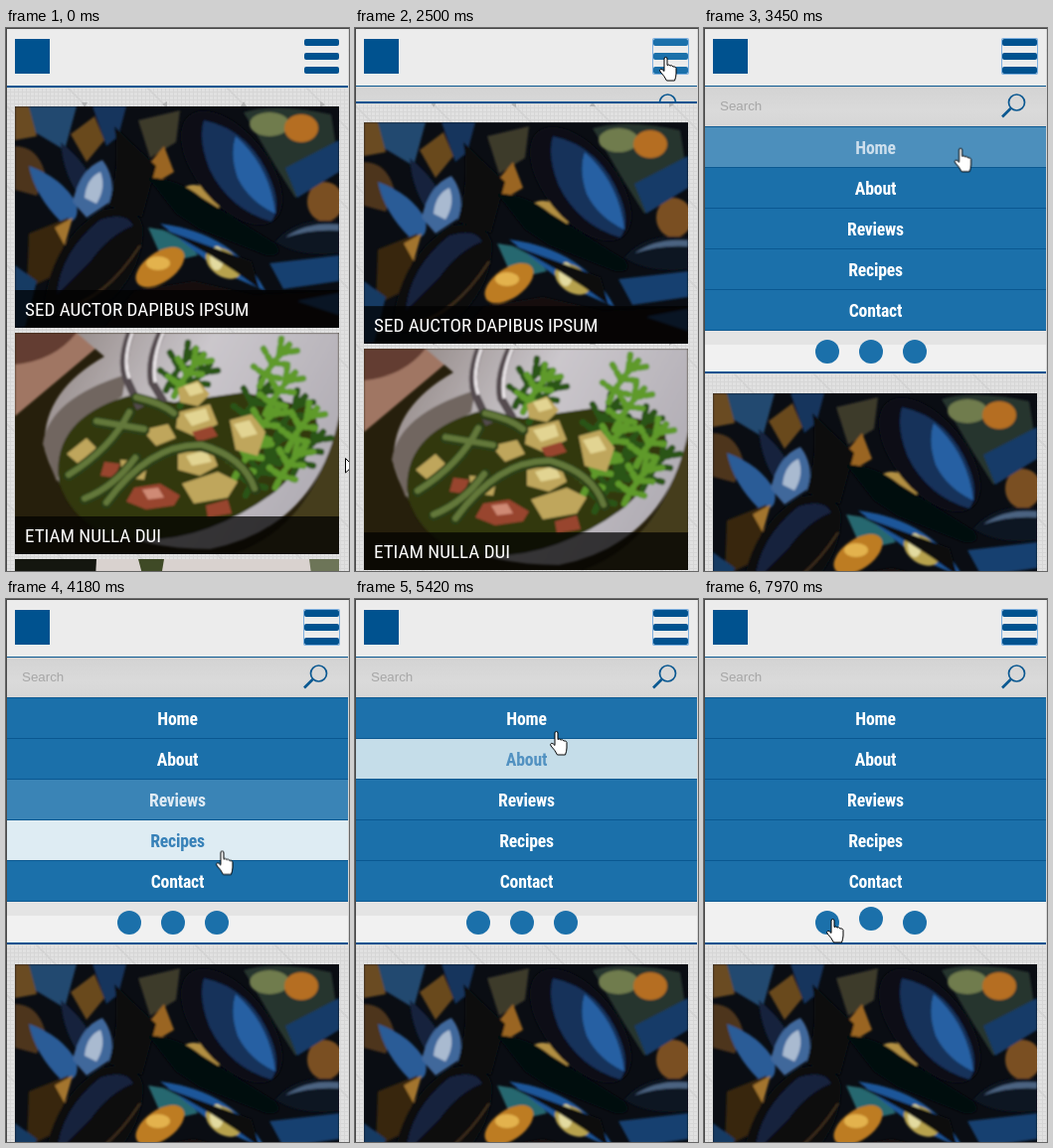
Write an HTML page that moves like this. It is 345 px wide and 547 px high and loops after 8000 ms.

```html
<!DOCTYPE html>
<html lang="en">
<head>
<meta charset="utf-8">
<title>Mobile menu</title>
<style>
@property --h { syntax: '<number>'; inherits: true; initial-value: 0 }
* { box-sizing: border-box }
html, body { margin: 0; width: 100%; height: 100%; overflow: hidden }
body { position: relative; background: #dedede; font-family: "Roboto Condensed", Roboto, sans-serif; font-stretch: 75% }
.stage, .stage > *, .abs { position: absolute }
.stage { left: 0; top: 0; width: 345px; height: 547px; overflow: hidden }
.stage * { animation: 8s ease infinite both }
.back { left: 0; top: 0 }
.frame { inset: 0; border: solid #4a4a4a; border-width: 1px 0 0 1px }

.page { left: 9px; top: 79px; width: 326px; animation-name: page; animation-timing-function: linear }
.card { position: relative; height: 223px; margin-bottom: 5px; overflow: hidden; opacity: calc(1 - .16 * var(--h)) }
.card svg { display: block }
.card p { position: absolute; left: 0; right: 0; bottom: 0; height: 38px; margin: 0; padding-left: 10px;
  background: rgba(0, 0, 0, .72); color: #fff; font-size: 19.1px; line-height: 39px; white-space: nowrap }
.c1 { animation-name: c1 }
.c2 { animation-name: c2 }

.head { left: 1px; top: 1px; width: 343px; height: 58px; background: #ececec; border-bottom: 1px solid #0a5891 }
.logo { left: 8px; top: 10px; width: 35px; height: 35px; background: #00528f }
.burger { left: 298px; top: 9px; width: 37px; height: 37px; border-radius: 2px; animation-name: ring; animation-timing-function: step-end }
.burger i { left: 1px; width: 35px; height: 7px; border-radius: 2px; animation-name: bar }

.nav { left: 1px; top: 57px; width: 343px; height: 3px; overflow: hidden; background: #f1f1f1;
  border-bottom: 2px solid #00528f; animation-name: nav; animation-timing-function: linear }
.search { left: 0; top: 2px; width: 343px; height: 40px; background: linear-gradient(#d3d3d3, #dadada 60%, #d6d6d6); color: #a6a6a6;
  font: 13.33px/40px "Liberation Sans", Arial, sans-serif; padding-left: 15px }
.search svg { position: absolute; left: 296px; top: 5px }
.menu { left: 0; top: 42px; width: 343px; border-top: 1px solid #0a5891 }
.menu a { display: block; height: 41px; border-bottom: 1px solid #0a5891; text-align: center;
  font-size: 17.7px; font-weight: 700; letter-spacing: -.2px; line-height: 42px;
  background: color-mix(in srgb, #dfedf3 calc(var(--h) * 100%), #1b70aa);
  color: color-mix(in srgb, #3680b8 calc(var(--h) * 100%), #fff) }
.strip { left: 0; top: 248px; width: 343px; height: 14px; background: #e4e4e4; animation-name: strip; animation-timing-function: step-end }
.dot { top: 257px; width: 24px; height: 24px; border-radius: 50%; background: #1b70aa; transform: translateY(calc(-4px * var(--h))) }

.tip { left: 200px; top: 135px; width: 103px; height: 26px; background: #fafafa; border: 1px solid #767676; box-shadow: 3px 3px 2px rgba(0, 0, 0, .4);
  color: #575757; font: 15px/24px "Open Sans", sans-serif; text-align: center; white-space: nowrap; animation-name: tip }
.cursor { left: 0; top: 0; width: 20px; height: 27px; animation-name: cursor; animation-timing-function: linear }
.cursor path { fill: #fff; stroke: #000; animation-timing-function: step-end }
.arrow { animation-name: arrow }
.hand { animation-name: hand }

/* one loop is 8000 ms, so 1% is 80 ms */
@keyframes page {
  0%, 30.28% { transform: none; animation-timing-function: cubic-bezier(.37, 0, .63, 1) }
  36.7%, 100% { transform: translateY(289px) }
}
@keyframes nav {
  0%, 30.28% { height: 3px; animation-timing-function: cubic-bezier(.37, 0, .63, 1) }
  36.7%, 100% { height: 291px }
}
@keyframes c1 { 0%, 12.2% { --h: 0 } 15.8%, 17.8% { --h: 1 } 21.5%, 100% { --h: 0 } }
@keyframes c2 { 0%, 6.8% { --h: 0 } 10.4%, 11.8% { --h: 1 } 15.5%, 100% { --h: 0 } }
@keyframes bar { 0%, 20.5% { background: #00528f } 22%, 39.5% { background: #1b70aa } 41.5%, 100% { background: #00528f } }
@keyframes ring { 0% { box-shadow: none } 29.75%, 100% { box-shadow: inset 0 0 0 1px #7fb0df } }
@keyframes home { 0%, 42.8% { --h: 0 } 44.5% { --h: .85 } 47.5%, 67.7% { --h: 0 } 71%, 80.45% { --h: 1 } 83.75%, 100% { --h: 0 } }
@keyframes about { 0%, 44.5% { --h: 0 } 47% { --h: .9 } 50.5%, 65.4% { --h: 0 } 67.5% { --h: .94 } 70.5%, 80.45% { --h: 0 } 80.9% { --h: .18 } 82%, 100% { --h: 0 } }
@keyframes reviews { 0%, 47% { --h: 0 } 50.1% { --h: 1 } 54.1%, 63.6% { --h: 0 } 65.4% { --h: .6 } 68.5%, 80.9% { --h: 0 } 82% { --h: .35 } 84.5%, 100% { --h: 0 } }
@keyframes recipes { 0%, 50.1% { --h: 0 } 52.5%, 52.9% { --h: 1 } 55.75%, 62.6% { --h: 0 } 63.6% { --h: .4 } 66%, 82% { --h: 0 } 83.1% { --h: .35 } 85.5%, 100% { --h: 0 } }
@keyframes contact { 0%, 52.9% { --h: 0 } 55.75%, 62.6% { --h: 1 } 65.5%, 83.1% { --h: 0 } 86.2% { --h: 1 } 89.1%, 100% { --h: 0 } }
@keyframes strip { 0% { opacity: 1 } 88%, 100% { opacity: 0 } }
@keyframes d3 { 0%, 87.5% { --h: 0 } 89.1%, 92% { --h: 1 } 94.4%, 100% { --h: 0 } }
@keyframes d2 { 0%, 92.6% { --h: 0 } 94.4%, 99.5% { --h: 1 } 100% { --h: .95 } }
@keyframes tip { 0%, 76.5% { opacity: 0 } 78.5%, 81% { opacity: 1 } 82.5%, 100% { opacity: 0 } }
@keyframes arrow { 0% { visibility: visible } 6.8%, 100% { visibility: hidden } }
@keyframes hand { 0% { visibility: hidden } 6.8%, 100% { visibility: visible } }
@keyframes cursor {
  0%, 6.1% { transform: translate(341px, 433px) }
  9% { transform: translate(300px, 385px) }
  12.2% { transform: translate(288px, 290px) }
  15.9%, 16.6% { transform: translate(292px, 190px) }
  22%, 39.1% { transform: translate(312px, 29px) }
  43.1% { transform: translate(258px, 120px) }
  44.5% { transform: translate(240px, 145px) }
  47% { transform: translate(224px, 184px) }
  49.2% { transform: translate(219px, 210px) }
  52.2% { transform: translate(217px, 253px) }
  55.7%, 62% { transform: translate(212px, 280px) }
  65% { transform: translate(206px, 190px) }
  67.75% { transform: translate(202px, 133px) }
  69.9%, 79.7% { transform: translate(200px, 114px) }
  80.9% { transform: translate(198px, 183px) }
  83.1% { transform: translate(201px, 264px) }
  86.25%, 87% { transform: translate(205px, 306px) }
  89.1%, 91.4% { transform: translate(212px, 322px) }
  94.4%, 97.4% { transform: translate(168px, 322px) }
  99.6%, 100% { transform: translate(129px, 322px) }
}
</style>
</head>
<body>
<div class="stage">
  <svg class="back" width="345" height="547">
    <defs>
      <pattern id="grid" width="4" height="4" patternUnits="userSpaceOnUse"><path d="M0 .5H4M.5 0V4" stroke="#d6d6d6"/></pattern>
      <pattern id="marks" x="39" y="37" width="320" height="80" patternUnits="userSpaceOnUse">
        <path d="M0 0L80 80M80 0l80 80M160 0l80 80M240 0l80 80" stroke="#d3d3d3" stroke-width="2"/>
        <path d="M37 38h6l-3 5zM123 37v6l-5-3zM197 42h6l-3-5zM277 37v6l5-3z" fill="#b4b4b4"/>
      </pattern>
      <filter id="soft"><feGaussianBlur stdDeviation="1.3"/></filter>
    </defs>
    <rect width="345" height="547" fill="#e1e1e1"/>
    <rect width="345" height="547" fill="url(#grid)"/>
    <rect width="345" height="547" fill="url(#marks)"/>
  </svg>

  <div class="page">
    <div class="card c1">
      <svg width="326" height="223">
        <rect width="326" height="223" fill="#0a0d13"/>
        <g filter="url(#soft)">
          <path d="M8 0H62L50 44 20 26z" fill="#23486f"/>
          <path d="M0 0H14L22 30 0 34z" fill="#6b4c20"/>
          <path d="M0 40Q22 40 30 66L22 90 0 84z" fill="#4d351c"/>
          <path d="M56 28L80 10 90 34 72 56z" fill="#69491f"/>
          <path d="M78 0H112L104 30 92 40z" fill="#18355d"/>
          <path d="M124 14L166 4 162 36 136 52z" fill="#3c3a2c"/>
          <path d="M128 66L150 40 160 66 140 78z" fill="#9a6521"/>
          <path d="M230 6Q262 -4 318 8L326 60 282 92 262 60z" fill="#27362f"/>
          <ellipse cx="256" cy="18" rx="20" ry="12" fill="#6f7c4d"/>
          <ellipse cx="288" cy="22" rx="17" ry="14" fill="#b56e23"/>
          <ellipse cx="312" cy="96" rx="18" ry="20" fill="#7a5022"/>
          <path d="M272 62L326 34V66L284 92z" fill="#163b68"/>
          <path d="M14 60Q20 90 46 116 66 120 62 98 48 72 14 60z" fill="#2a5c97"/>
          <path d="M46 36Q74 58 84 88L70 98Q48 70 46 36z" fill="#12233d"/>
          <path d="M58 96Q66 62 88 54 102 72 96 96L72 112z" fill="#41679b"/>
          <path d="M70 92Q72 72 86 66 92 82 82 98z" fill="#a9bad0"/>
          <path d="M100 20Q106 60 94 100L128 112 142 60z" fill="#07090e"/>
          <path d="M14 128L54 112 44 168 12 184z" fill="#38270f"/>
          <path d="M40 122L58 112 50 140z" fill="#a3742e"/>
          <path d="M0 160L22 176 10 223H0z" fill="#163a63"/>
          <path d="M134 122L170 128 184 150 150 158z" fill="#286770"/>
          <ellipse cx="146" cy="162" rx="28" ry="15" transform="rotate(-35 146 162)" fill="#bd7c21"/>
          <ellipse cx="144" cy="158" rx="12" ry="7" fill="#e3b24d"/>
          <ellipse cx="188" cy="92" rx="20" ry="11" transform="rotate(25 188 92)" fill="#b28f43"/>
          <ellipse cx="218" cy="62" rx="68" ry="36" transform="rotate(51 218 62)" fill="#080b13"/>
          <path d="M190 14Q238 24 258 76 268 102 258 116 216 104 196 64 184 34 190 14z" fill="#14305a"/>
          <path d="M222 30Q256 60 262 108 236 96 224 72 216 48 222 30z" fill="#2860a3"/>
          <path d="M146 118Q222 128 252 186L206 166z" fill="#1f569a"/>
          <ellipse cx="210" cy="158" rx="20" ry="13" transform="rotate(35 210 158)" fill="#b7a24d"/>
          <ellipse cx="203" cy="153" rx="7" ry="12" fill="#e3dba0"/>
          <path d="M144 122L238 156 246 184Q196 146 144 122z" fill="#090b10"/>
          <path d="M134 72Q164 72 188 92L262 138Q272 152 252 150L186 124 162 108z" fill="#06080d"/>
          <path d="M262 136Q284 110 326 116V148Q284 152 262 136z" fill="#0b1424"/>
          <path d="M272 132Q294 116 326 119V125Q298 123 272 132z" fill="#4b6381"/>
          <path d="M256 158L326 150V176L270 184z" fill="#183f70"/>
          <path d="M28 210Q34 136 88 104 124 98 129 122 130 160 100 192 70 216 28 210z" fill="#070a11"/>
          <path d="M42 190Q46 146 86 114 112 106 119 120 94 130 76 156z" fill="#14233d"/>
          <path d="M46 204Q90 196 126 140" fill="none" stroke="#46341f" stroke-width="2"/>
          <path d="M120 186L180 176 240 190 326 186V223H90z" fill="#12100c"/>
          <path d="M284 196L326 188V210z" fill="#204c82"/>
        </g>
      </svg>
      <p>SED AUCTOR DAPIBUS IPSUM</p>
    </div>
    <div class="card c2">
      <svg width="326" height="223">
        <defs>
          <linearGradient id="bowl" x2="1" y2=".4"><stop stop-color="#8d827f"/><stop offset=".5" stop-color="#cbc7cc"/><stop offset="1" stop-color="#b3afb6"/></linearGradient>
          <path id="leaf" d="M0 44Q10 22 30 2M5 32L-6 24M5 32L20 36M12 20L4 6M12 20L28 22M20 11L22 -4M20 11L38 8" fill="none" stroke-width="6.5" stroke-linecap="round" stroke-dasharray="7 5"/>
        </defs>
        <rect width="326" height="223" fill="#261f0c"/>
        <g filter="url(#soft)">
          <path d="M0 0H100L0 84z" fill="#a07663"/>
          <path d="M0 0H62Q40 28 0 32z" fill="#643c30"/>
          <path d="M326 0V223H220Q310 190 326 70z" fill="#453d1c"/>
          <path d="M62 0H326V84Q304 196 196 218 60 218 30 118 26 60 90 24z" fill="url(#bowl)"/>
          <path d="M28 112Q34 66 112 42L108 64Q52 94 42 150z" fill="#716660"/>
          <path d="M44 150Q36 84 120 62L160 70 230 60 300 76Q316 110 262 160 180 220 100 206 58 192 44 150z" fill="#33390f"/>
          <path d="M116 0Q106 28 112 46L126 76M147 0Q134 28 138 50L150 70" fill="none" stroke="#554c50" stroke-width="8"/>
          <path d="M118 0Q108 28 115 46M149 0Q137 28 141 50" fill="none" stroke="#eee9ec" stroke-width="3"/>
          <g stroke="#2c5417">
            <use href="#leaf" x="152" y="14"/><use href="#leaf" x="166" y="30"/><use href="#leaf" x="226" y="50"/>
            <use href="#leaf" x="262" y="62"/><use href="#leaf" x="246" y="96"/><use href="#leaf" x="232" y="120"/><use href="#leaf" x="280" y="98"/>
          </g>
          <g stroke="#5f9a2c">
            <use href="#leaf" x="246" y="10"/><use href="#leaf" x="252" y="38"/><use href="#leaf" x="236" y="72"/>
            <use href="#leaf" x="274" y="74"/><use href="#leaf" x="220" y="104"/><use href="#leaf" x="262" y="112"/><use href="#leaf" x="160" y="20"/>
          </g>
          <g fill="#bfa65c">
            <path d="M164 56L184 48 196 62 184 74 166 70zM164 80L196 72 204 92 180 104 162 96zM216 88L238 82 252 100 244 124 222 118zM164 120L196 114 204 134 186 144 164 138zM168 152L204 140 224 150 214 166 180 172zM128 98L154 92 162 106 142 114zM52 122L72 106 84 118 66 134zM106 128L134 130 130 148 108 146z"/>
          </g>
          <path d="M170 54L184 50 190 60 176 64zM170 82L192 76 196 88 178 94zM220 92L236 88 244 102 228 106zM172 124L192 118 198 130 178 134z" fill="#e2d492"/>
          <g fill="#98442f">
            <path d="M120 156L146 152 166 164 160 174 132 178 112 170zM178 100L198 94 204 104 184 110zM90 130L106 132 100 146 86 144zM192 174L214 168 218 182 194 186z"/>
          </g>
          <path d="M128 158L144 156 150 166 134 168z" fill="#cf8a74"/>
          <path id="beans" d="M54 144Q96 118 116 80M122 66Q148 72 160 82M70 168Q100 156 122 126M92 172Q136 112 188 114 230 126 242 158M82 90L130 98" fill="none" stroke="#2c3d14" stroke-width="11" stroke-linecap="round"/>
          <path d="M54 143Q96 117 115 80M122 65Q148 71 160 81M70 167Q100 155 121 126M92 171Q136 111 188 113 230 125 241 157M82 89L130 97" fill="none" stroke="#63783a" stroke-width="6" stroke-linecap="round"/>
        </g>
      </svg>
      <p>ETIAM NULLA DUI</p>
    </div>
    <div class="card">
      <svg width="326" height="223">
        <rect width="326" height="223" fill="#d9d2cf"/>
        <path d="M0 0H82L70 223H0z" fill="#14160f"/>
        <path d="M124 0H150L140 60z" fill="#3f4a26"/>
        <path d="M296 0H326V223z" fill="#6d7558"/>
      </svg>
    </div>
  </div>

  <div class="nav">
    <div class="search abs">Search
      <svg width="30" height="30" fill="none" stroke="#0a5891"><circle cx="17.5" cy="11" r="8" stroke-width="1.7"/><path d="M11.5 17L3 25.5" stroke-width="2.6"/></svg>
    </div>
    <div class="menu abs">
      <a style="animation-name:home">Home</a>
      <a style="animation-name:about">About</a>
      <a style="animation-name:reviews">Reviews</a>
      <a style="animation-name:recipes">Recipes</a>
      <a style="animation-name:contact">Contact</a>
    </div>
    <div class="strip abs"></div>
    <i class="dot abs" style="left:111px"></i>
    <i class="dot abs" style="left:155px;animation-name:d2"></i>
    <i class="dot abs" style="left:199px;animation-name:d3"></i>
  </div>

  <div class="head">
    <div class="logo abs"></div>
    <div class="burger abs">
      <i class="abs" style="top:1px"></i><i class="abs" style="top:15px"></i><i class="abs" style="top:29px"></i>
    </div>
  </div>

  <div class="tip">Coming Soon</div>
  <svg class="cursor" overflow="visible">
    <path class="arrow" d="M.5 .5V15L4 11.8 6.4 17 8.8 16 6.5 11H11z"/>
    <path class="hand" transform="translate(-6)" d="M5 2Q5 .5 6.5 .5T8 2V8.5Q9.5 7.3 11 9 12.5 8 14 10 16 9.2 17 11.5V17Q17 20 15.5 24H7.5Q5 19 1 15 0 13 1.5 12.4 3 12 5 14.5z"/>
  </svg>
  <div class="frame"></div>
</div>
</body>
</html>
```
